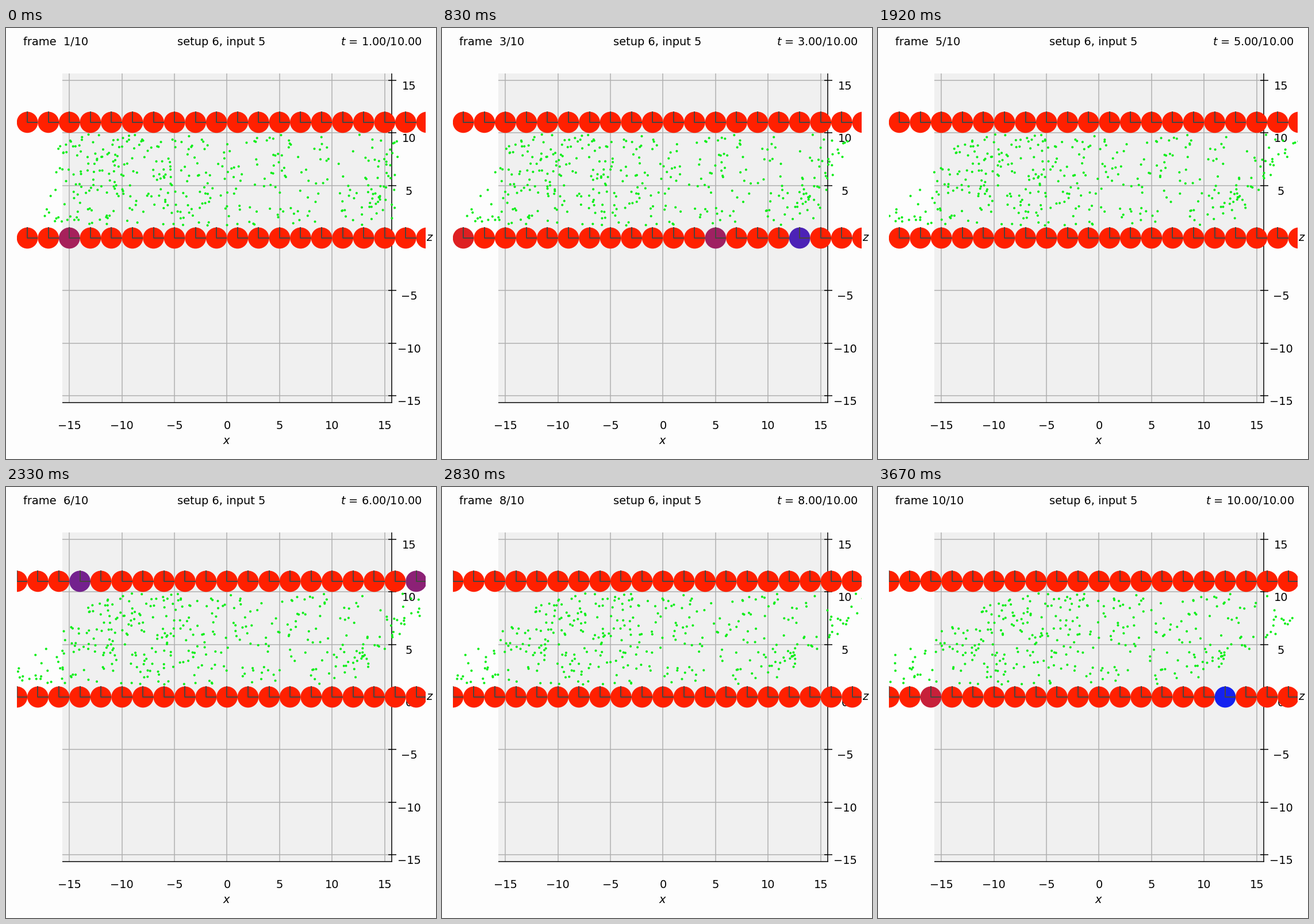
A matplotlib script for the animation above (3.75 s loop, 748x749 px).

```python
import numpy as np
import matplotlib.pyplot as plt
from matplotlib.animation import FuncAnimation
from matplotlib.collections import EllipseCollection, LineCollection
from matplotlib.patches import Rectangle

W, H = 748, 749
FRAMES, LOOP_MS = 200, 3750
INTERVAL = LOOP_MS / FRAMES
STEP_MS, LEAD_MS = 400, 42   # every step lasts 400 ms, the first one is cut short
STEPS = 10

UNIT = 18.283            # pixels per data unit
X0, Z0 = 384.5, 365.0    # pixel position of the data origin
LEFT, RIGHT, TOP, BOTTOM = 98.5, 671, 79, 651
SHEAR = 0.191            # velocity gradient per step
MID_Z = 5.51             # height where the flow stands still

RED = np.array([255, 32, 0]) / 255
BLUE = np.array([20, 34, 240]) / 255
GREEN = "#0eee1a"
FONT_PX = 19.4

# step -> {(wall height, sphere x): how far its colour goes to blue}
HITS = {
    1: {(0, -15): 0.38},
    3: {(0, -19): 0.14, (0, 5): 0.41, (0, 13): 0.76},
    4: {(0, -16): 0.14, (0, 14): 0.08},
    6: {(11, -14): 0.59, (11, 18): 0.49},
    10: {(0, -16): 0.24, (0, 12): 1.0},
}

plt.rcParams["font.family"] = "DejaVu Sans"
plt.rcParams["mathtext.fontset"] = "dejavusans"


def pt(px):
    return px * 0.72


def to_px(x, z):
    return np.column_stack([X0 + UNIT * np.asarray(x, float),
                            Z0 - UNIT * np.asarray(z, float)])


def make_dots():
    """Particles at time zero: denser on the left, with a cluster on the right."""
    rng = np.random.default_rng(6)
    edges = [-16.7, -15, -10, -5, 0, 5, 10, 16.5]
    counts = [24, 86, 63, 57, 45, 40, 42]
    x = np.concatenate([rng.uniform(a, b, n)
                        for a, b, n in zip(edges, edges[1:], counts)])
    z = rng.uniform(1.2, 9.85, x.size)
    cluster_x = rng.normal(14.5, 0.7, 30)
    cluster_z = rng.uniform(2.2, 8, 30)
    return np.append(x, cluster_x), np.append(z, cluster_z)


fig = plt.figure(figsize=(7.48, 7.49), dpi=100, facecolor="#fdfdfd")
ax = fig.add_axes([0, 0, 1, 1])
ax.set(xlim=(0, W), ylim=(H, 0))
ax.axis("off")


def line(xs, ys, color, z):
    ax.plot(xs, ys, color=color, lw=pt(1.5), zorder=z, solid_capstyle="butt")


def label(x, baseline, text, ha="center"):
    return ax.text(x, baseline, text, ha=ha, va="baseline",
                   fontsize=pt(FONT_PX), color="black", zorder=3)


def draw_axes():
    ax.add_patch(Rectangle((LEFT, TOP), RIGHT - LEFT, BOTTOM - TOP,
                           fc="#f0f0f0", ec="none", zorder=0))
    for v in range(-15, 16, 5):
        x, y = to_px([v], [v])[0]
        line([x, x], [TOP, BOTTOM], "#b0b0b0", 1)
        line([LEFT, RIGHT], [y, y], "#b0b0b0", 1)
        line([665.5, 679.5], [y, y], "black", 2)
        text = str(v).replace("-", "\u2212")
        label(x, 697, text)
        label(701, y + 16, text)
    line([LEFT, RIGHT + 0.7], [BOTTOM, BOTTOM], "black", 2)
    line([RIGHT, RIGHT], [TOP, BOTTOM], "black", 2)
    label(384, 723, "$x$")
    label(737, 370.5, "$z$")


draw_axes()
frame_text = label(30, 29.5, "", "left")
label(375, 29.5, "setup 6, input 5")
time_text = label(724, 29.5, "", "right")


def discs(diameter, color, z):
    return EllipseCollection(diameter, diameter, 0, units="x", offsets=[(0, 0)],
                             offset_transform=ax.transData, facecolors=color,
                             edgecolors="none", zorder=z)


spheres = discs(2 * UNIT + 0.2, [RED], 4)
marks = LineCollection([], colors="#484440", linewidths=pt(2), zorder=5)
dots = discs(4.1, GREEN, 6)
window = Rectangle((19, 60), 711, 600, transform=ax.transData)
for artist in (spheres, marks, dots):
    ax.add_collection(artist, autolim=False)
    artist.set_clip_path(window)

dot_x, dot_z = make_dots()


def update(frame):
    step = int((frame * INTERVAL + LEAD_MS) // STEP_MS) + 1
    frame_text.set_text(f"frame {step:2d}/{STEPS}")
    time_text.set_text(f"$t$ = {step:.2f}/{STEPS:.2f}")

    hits = HITS.get(step, {})
    places = [(wall, x) for wall in (0, 11)
              for x in range(-20 + step % 2, 21, 2)]
    centres = to_px([x for _, x in places], [wall for wall, _ in places])
    spheres.set_offsets(centres)
    spheres.set_facecolor([RED + hits.get(p, 0) * (BLUE - RED) for p in places])
    marks.set_segments([[(x, y - UNIT - 0.5), (x, y), (x + UNIT, y)]
                        for x, y in centres])

    dots.set_offsets(to_px(dot_x + SHEAR * (dot_z - MID_Z) * step, dot_z))
    return frame_text, time_text, spheres, marks, dots


anim = FuncAnimation(fig, update, frames=FRAMES, interval=INTERVAL,
                     repeat=True, repeat_delay=0, blit=False)
plt.show()
```
